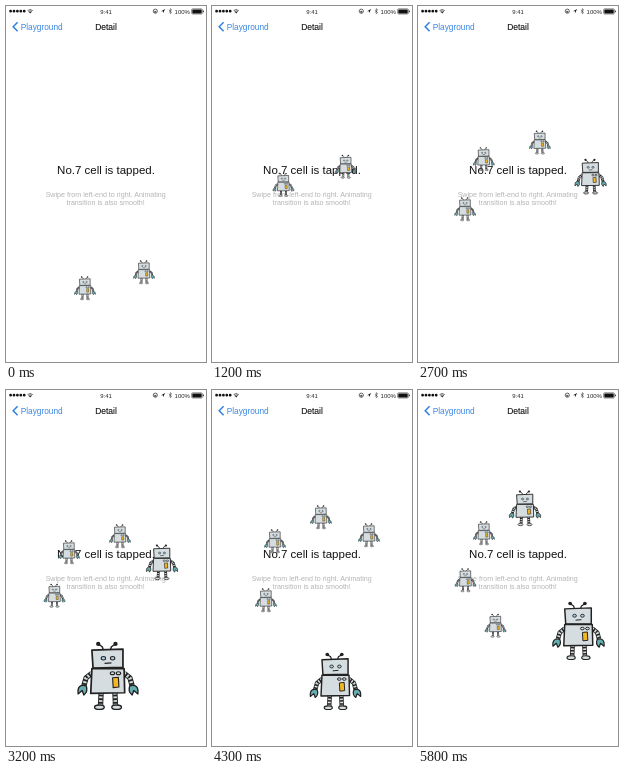
An HTML page with a canvas that plays this animation: 200 px wide and 356 px high, repeating every 5.9 s.

```html
<!DOCTYPE html>
<html lang="en">
<head>
<meta charset="utf-8">
<title>Touch robots</title>
<style>
html, body { margin: 0; width: 100%; height: 100%; overflow: hidden; background: #fff; }
svg, canvas { position: absolute; left: 0; top: 0; width: 200px; height: 356px; }
text { font-family: "Liberation Sans", Arial, sans-serif; }
</style>
</head>
<body>
<svg viewBox="0 0 200 356">
  <path d="M4.6 5.2h14" stroke="#111" stroke-width="2.8" stroke-linecap="round" stroke-dasharray="0 3.4"/>
  <g fill="#111">
    <path d="M24.2 7.5 l-1.1 -1.2 a1.6 1.6 0 0 1 2.2 0z"/>
    <path d="M159.1 3 l-4 2.3 h1.9 v2z"/>
    <rect x="186.3" y="3.4" width="9.4" height="4" rx=".7"/>
    <rect x="197" y="4.6" width=".8" height="1.6"/>
  </g>
  <g fill="none" stroke="#222" stroke-width=".7">
    <path d="M21.6 4.7 a3.8 3.8 0 0 1 5.2 0 M22.4 5.8 a2.6 2.6 0 0 1 3.6 0"/>
    <circle cx="149.3" cy="5.2" r="2.1"/><path d="M148.6 5.4h1.4v.8h-1.4z"/>
    <path d="M162.9 3.8 l2.8 2.7 -1.4 1.3 v-5.2 l1.4 1.3 -2.8 2.7" stroke-width=".5"/>
    <rect x="185.6" y="2.8" width="10.8" height="5.2" rx="1.1" stroke-width=".5"/>
  </g>
  <g font-size="6" fill="#222">
    <text x="100" y="7.5" text-anchor="middle">9:41</text>
    <text x="168.6" y="7.5">100%</text>
  </g>
  <path d="M11.6 16.3 L7.2 20.8 L11.6 25.3" fill="none" stroke="#2f80e0" stroke-width="1.5"/>
  <text x="14.7" y="23.6" font-size="8.3" fill="#3b87e0">Playground</text>
  <g text-anchor="middle" fill="#111">
    <text x="100" y="23.6" font-size="8.5" stroke="#111" stroke-width=".1">Detail</text>
    <text x="100" y="168" font-size="11.5">No.7 cell is tapped.</text>
    <g font-size="7.12" fill="#b4b4b4">
      <text x="99.7" y="190.6">Swipe from left-end to right. Animating</text>
      <text x="99.7" y="199">transition is also smooth!</text>
    </g>
  </g>
</svg>
<canvas id="stage"></canvas>
<script>
const LOOP = 5900, STEP = 100;
const BEATS = [2000, 3200, 4300, 5000, 5800];
const SMALL = 24;
const INK = '#222', METAL = '#d6dde0', TEAL = '#65aeb2';

// Path: [x, y, height?] at each beat. A finger shows from its landing time on.
const fingers = [
  { land: 0, from: [79, 282], path: [[70, 137], [63, 162], [63, 151], [39.5, 176], [47.5, 190]] },
  { land: 0, from: [138, 266], path: [[133, 118], [114, 146], [109, 127], [63.5, 132], [66, 143]] },
  { land: 2200, path: [[198, 163, 28], [156, 172, 36], [157, 145], [110, 117], [107, 118, 36]] },
  { land: 2600, path: [[46, 200], [48.5, 205.5], [54, 210], [60, 228.5], [77.5, 235.5]] },
  { land: 2800, sway: 12, path: [[96, 338, 60], [102, 285.5, 69], [123.5, 291, 58], [157.5, 255.5, 59], [160.5, 240.5, 59]] }
];

const canvas = document.getElementById('stage');
const ctx = canvas.getContext('2d');
const dpr = window.devicePixelRatio || 1;
canvas.width = 200 * dpr;
canvas.height = 356 * dpr;

const mix = (a, b, u) => a + (b - a) * u;
const slowing = (u, k) => u * (1 + k - k * u);

function spline(a, b, c, d, u) {
  const v = 1 - u;
  return v * v * (1 + 2 * u) * b + u * u * (3 - 2 * u) * c
    + u * v * (v * (c - a) - u * (d - b)) / 2;
}

function pose({ from, path, sway = 0 }, t) {
  if (t < BEATS[0]) {
    const u = t / BEATS[0];
    return [mix(from[0], path[0][0], slowing(u, 1)), mix(from[1], path[0][1], slowing(u, 0.47)), SMALL];
  }
  const last = BEATS.length - 1;
  let i = 0;
  while (i < last - 1 && t >= BEATS[i + 1]) i++;
  const u = (t - BEATS[i]) / (BEATS[i + 1] - BEATS[i]);
  const near = path[u < 0.5 ? i : i + 1];
  const at = c => spline(path[Math.max(0, i - 1)][c], path[i][c], path[i + 1][c], path[Math.min(last, i + 2)][c], u);
  const swing = i === last - 1 ? sway * Math.sin(Math.PI * u) : 0;
  return [at(0) + swing, at(1), near[2] || SMALL];
}

function shape(points, fill, width, close = true) {
  ctx.beginPath();
  points.forEach(([x, y]) => ctx.lineTo(x, y));
  if (close) ctx.closePath();
  paint(fill, width);
}

function oval(x, y, rx, ry, fill, width = 0) {
  ctx.beginPath();
  ctx.ellipse(x, y, rx, ry, 0, 0, 2 * Math.PI);
  paint(fill, width);
}

function paint(fill, width, ink = INK) {
  if (fill) {
    ctx.fillStyle = fill;
    ctx.fill();
  }
  if (width) {
    ctx.lineWidth = width;
    ctx.strokeStyle = ink;
    ctx.stroke();
  }
}

function limb(...points) {
  shape(points, null, 4.6, false);
  ctx.setLineDash([1.6, 1.6]);
  paint(null, 3, METAL);
  ctx.setLineDash([]);
}

// Antenna, arm, claw, leg and foot on the right; mirrored for the left
function side(s) {
  ctx.save();
  ctx.scale(s, 1);
  const lean = -s;
  shape([[3 + lean, -22], [4 + lean, -25], [7 + lean, -27]], null, 1.3, false);
  oval(7.5 + lean, -27.5, 1.9, 1.8, INK);
  limb([14, -2], [19, 2], [21, 9]);
  ctx.beginPath();
  ctx.moveTo(19, 9);
  ctx.quadraticCurveTo(27, 7, 26, 16);
  ctx.lineTo(22.5, 13);
  ctx.lineTo(21, 17);
  ctx.quadraticCurveTo(17, 14, 19, 9);
  paint(TEAL, 1.2);
  limb([6, 15], [6.5, 26]);
  oval(7.5, 27.6, 4.2, 1.9, METAL, 1.2);
  ctx.restore();
}

function robot(x, y, h) {
  ctx.save();
  ctx.translate(x, y);
  ctx.scale(h / 60, h / 60);
  ctx.lineJoin = 'round';
  side(-1);
  side(1);
  shape([[-14, -22], [13, -23], [13, -7], [-13, -6.5]], METAL, 1.5);
  shape([[-14, -6], [14, -6], [14.5, 15], [-15, 15.5]], METAL, 1.5);
  for (const s of [-1, 1]) {
    oval(s * 4, -15, 1.9, 1.5, '#a9cbe0', 0.9);
    oval(6.5 + s * 2.6, -2, 1.9, 1.3, METAL, 1);
  }
  shape([[-3, -10.5], [3, -11]], null, 1, false);
  shape([[4, 2], [9, 1.5], [9.5, 10], [4.5, 10.5]], '#f3b722', 1);
  ctx.restore();
}

function draw(now) {
  const t = Math.floor((now % LOOP) / STEP) * STEP;
  ctx.setTransform(dpr, 0, 0, dpr, 0, 0);
  ctx.clearRect(0, 0, 200, 356);
  fingers.filter(f => t >= f.land).forEach(f => robot(...pose(f, t)));
}

let start;
function tick(now) {
  if (start === undefined) start = now;
  draw(Math.max(0, now - start));
  requestAnimationFrame(tick);
}
draw(0);
requestAnimationFrame(tick);
</script>
</body>
</html>
```
